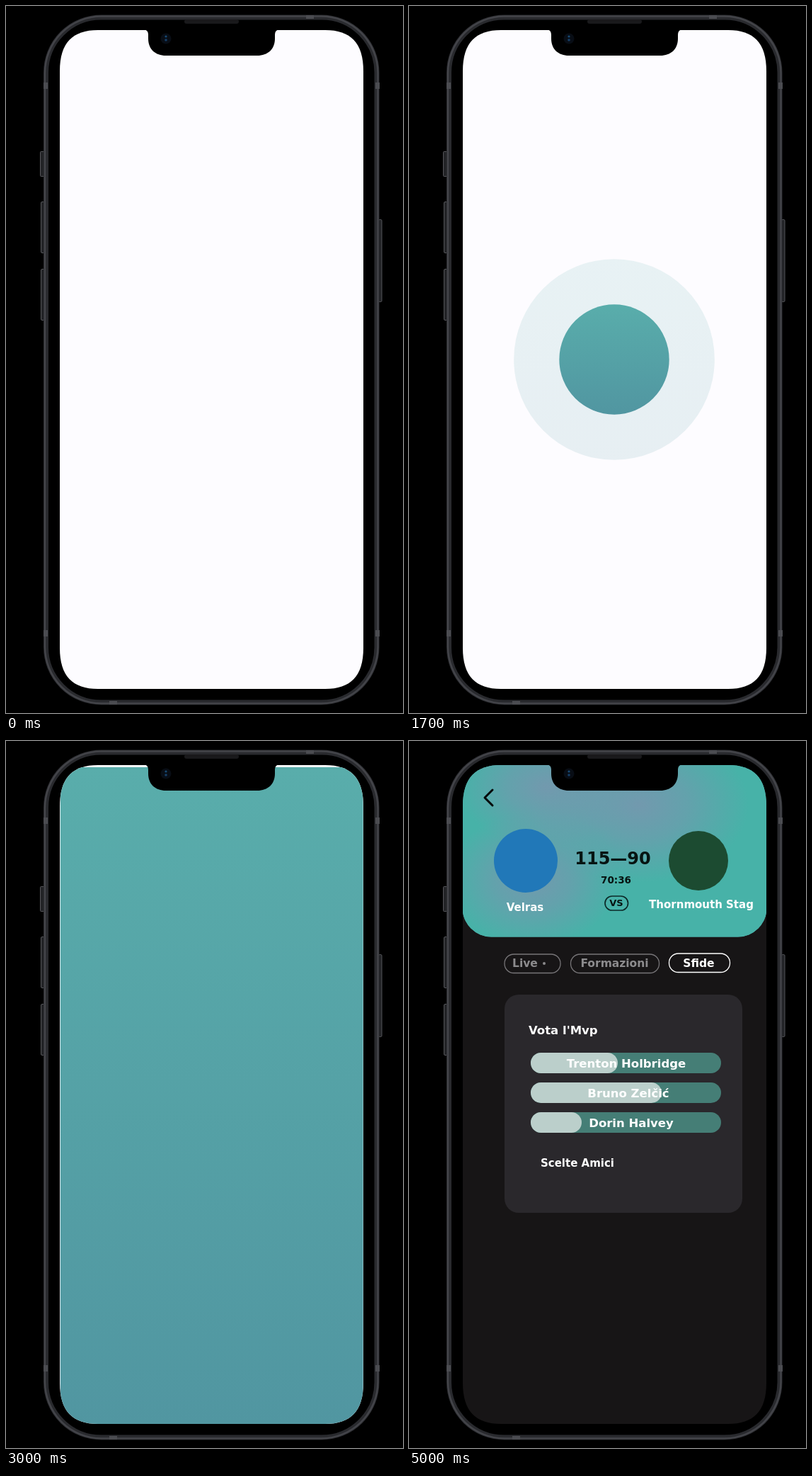
An HTML page for the animation above (5100 ms loop, 561 by 998 pixels).

```html
<!DOCTYPE html>
<html lang="it">
<head>
<meta charset="utf-8">
<title>Match app</title>
<style>
  html, body { margin: 0; width: 100%; height: 100%; overflow: hidden; background: #000; }
  svg { display: block; width: 561px; height: 998px; }
  text { font: bold 15px "DejaVu Sans", sans-serif; fill: #fff; }
  .mid { text-anchor: middle; }
  .ink { fill: #071412; }
  .name { font-size: 16.5px; }
  .tab { font-size: 15.5px; }
  .off { fill: #8c8b8d; }
  .line { fill: none; stroke-width: 1.3; }
</style>
</head>
<body>
<svg viewBox="0 0 561 998" xmlns="http://www.w3.org/2000/svg">
  <defs>
    <linearGradient id="sea" x1="0" y1="0" x2="0" y2="1">
      <stop offset="0" stop-color="#59adab"/>
      <stop offset="1" stop-color="#5196a1"/>
    </linearGradient>
    <radialGradient id="haze">
      <stop offset="0" stop-color="#7299ae"/>
      <stop offset=".45" stop-color="#7299ae" stop-opacity=".65"/>
      <stop offset="1" stop-color="#7299ae" stop-opacity="0"/>
    </radialGradient>
    <clipPath id="screen">
      <path d="M76 92C76 52 94 34 130 34H451C487 34 505 52 505 92V906C505 946 487 964 451 964H130C94 964 76 946 76 906Z"/>
    </clipPath>
    <clipPath id="headClip"><rect id="headShape" x="75.500" y="-60" width="430" rx="41"/></clipPath>
  </defs>

  <rect width="561" height="998"/>

  <!-- phone body -->
  <g fill="#222326" stroke="#55565a">
    <rect x="48.500" y="205.500" width="6" height="35" rx="1"/>
    <rect x="49.500" y="276.500" width="5" height="72" rx="1.500"/>
    <rect x="49.500" y="371.500" width="5" height="72" rx="1.500"/>
    <rect x="526.500" y="301.500" width="4.500" height="116" rx="1.500"/>
  </g>
  <rect x="56.500" y="16" width="467.500" height="967" rx="78" fill="#000" stroke="#292a2e" stroke-width="7"/>
  <rect x="55" y="14.500" width="470.500" height="970" rx="80" fill="none" stroke="#434449" stroke-width="2.500"/>
  <g fill="#4b4c51">
    <rect x="53" y="108" width="6" height="9"/><rect x="522" y="108" width="6" height="9"/>
    <rect x="53" y="881" width="6" height="9"/><rect x="522" y="881" width="6" height="9"/>
    <rect x="424" y="13" width="11" height="5"/><rect x="146" y="981" width="11" height="5"/>
  </g>

  <g clip-path="url(#screen)">
    <rect id="oldPage" x="75" y="33" width="431" height="932" fill="#fdfcff"/>
    <g id="splash">
      <rect x="75" y="34" width="431" height="932" fill="#fdfcff"/>
      <circle id="halo" cx="290" cy="499" fill="url(#sea)"/>
      <rect id="ball" fill="url(#sea)"/>
    </g>

    <g id="match">
      <rect x="75" y="33" width="431" height="932" fill="#171516"/>
      <g clip-path="url(#headClip)">
        <rect x="75" y="33" width="431" height="932" fill="url(#sea)"/>
        <g id="header">
          <rect x="75" y="33" width="431" height="932" fill="#47b2a8"/>
          <g id="blobs" fill="url(#haze)"></g>
          <rect id="lip" x="77" width="427" height="400" rx="36" fill="none" stroke="#1c5c60" stroke-width="2"/>
        </g>
      </g>
      <g id="info">
        <path d="M118 69L107 80L118 91" fill="none" stroke="#050909" stroke-width="3" stroke-linecap="round" stroke-linejoin="round"/>
        <circle cx="165" cy="169" r="45" fill="#2178b8"/>
        <circle cx="409" cy="169" r="42" fill="#1c4b31"/>
        <text class="mid" x="164" y="240">Velras</text>
        <text class="mid" x="413" y="236">Thornmouth Stag</text>
        <text class="mid ink" x="288" y="174" style="font-size:24px">115—90</text>
        <text class="mid ink" x="292.500" y="201" style="font-size:13.5px">70:36</text>
        <rect class="line" x="277" y="219" width="32.500" height="20" rx="10" stroke="#0c2a28" style="stroke-width:1.7"/>
        <text class="mid ink" x="293" y="233" style="font-size:13px">VS</text>
        <g class="line" stroke="#777578">
          <rect x="135" y="301" width="79" height="26.500" rx="13"/>
          <rect x="228.500" y="301" width="125" height="26.500" rx="13"/>
          <rect x="367.500" y="300" width="86" height="26.500" rx="13" stroke="#fff"/>
        </g>
        <text class="tab off" x="146" y="318.500">Live</text>
        <circle cx="191" cy="314" r="2" fill="#8c8b8d"/>
        <text class="tab mid off" x="290.500" y="318.500">Formazioni</text>
        <text class="tab mid" x="409.500" y="318.500">Sfide</text>
      </g>
      <g id="card">
        <rect x="135" y="358" width="336" height="308" rx="20" fill="#2a282c"/>
        <text x="169" y="414" style="font-size:16.5px">Vota l'Mvp</text>
        <g id="bars"></g>
        <text x="186" y="601">Scelte Amici</text>
      </g>
    </g>
  </g>

  <!-- notch, speaker and camera -->
  <path d="M195 33C199 34 201 36 201 41V46C201 61 211 70 226 70H355C370 70 380 61 380 46V41C380 36 382 34 386 33Z"/>
  <rect x="252" y="19" width="77" height="6" rx="3" fill="#19191b"/>
  <circle cx="226" cy="46" r="7.500" fill="#080d15"/>
  <circle cx="226" cy="43" r="1.600" fill="#174b75"/>
  <circle cx="226" cy="48" r="1.800" fill="#153f68"/>
</svg>

<script>
const LOOP = 5100, STEP = 100;
const $ = id => document.getElementById(id);
const clamp = u => Math.min(1, Math.max(0, u));
const part = (t, from, length) => clamp((t - from) / length);
const easeOut = u => 1 - (1 - u) ** 3;
const smooth = u => u * u * (3 - 2 * u);
const mix = (a, b, u) => a + (b - a) * u;

function set(el, attrs) {
  for (const key in attrs) el.setAttribute(key, attrs[key]);
  return el;
}
function add(parent, tag, attrs) {
  return parent.appendChild(set(document.createElementNS("http://www.w3.org/2000/svg", tag), attrs));
}
function show(id, on) {
  $(id).style.display = on ? "" : "none";
}

// each haze: cx, cy, rx, ry at the start and at the end of its drift
const hazes = [
  [[305, 110, 120, 100], [325, 90, 155, 110]],
  [[190, 195, 95, 75], [175, 195, 120, 95]],
  [[440, 55, 100, 60], [195, 65, 125, 85]]
].map(([from, to]) => ({ from, to, el: add($("blobs"), "ellipse", {}) }));

const bars = [
  ["Trenton Holbridge", 440, 123, 307],
  ["Bruno Zelčić", 482, 185, 310],
  ["Dorin Halvey", 524, 72, 314]
].map(([name, y, width, x]) => {
  const box = { x: 172, y, height: 29, rx: 14.5 };
  add($("bars"), "rect", { ...box, width: 269, fill: "#457e76" });
  const fill = add($("bars"), "rect", { ...box, width, fill: "#bbcfcb" });
  add($("bars"), "text", { x, y: y + 20.5, class: "mid name" }).textContent = name;
  return { fill, width };
});

function drawSplash(t) {
  const rise = easeOut(part(t, 50, 700));
  set($("oldPage"), { opacity: (1 - rise) ** 2 });
  set($("splash"), { transform: `translate(0 ${930 * (1 - rise)})` });

  const grow = smooth(part(t, 600, 700));
  const ripple = easeOut(part(t, 1300, 1000));
  const r = mix(mix(23, 66, grow), 94, smooth(part(t, 1300, 900)));
  set($("halo"), {
    r: mix(mix(23, 94, grow), 155, ripple),
    opacity: 0.6 * (1 - ripple)
  });

  // the disc opens into the whole screen
  const open = easeOut(part(t, 2400, 770));
  const left = mix(290 - r, 75.5, open), right = mix(290 + r, 506, open);
  const top = mix(499 - r, 33, open), bottom = mix(499 + r, 969, open);
  set($("ball"), {
    x: left, y: top, width: right - left, height: bottom - top,
    rx: r * (1 - open)
  });
}

function drawMatch(t) {
  const bottom = mix(966, 276.5, easeOut(part(t, 3050, 450)));
  set($("headShape"), { height: bottom + 60 });
  set($("header"), { opacity: smooth(part(t, 3050, 400)) });

  const drift = part(t, 3500, 1500);
  for (const { from, to, el } of hazes) {
    const [cx, cy, rx, ry] = from.map((v, i) => mix(v, to[i], drift));
    set(el, { cx, cy, rx, ry });
  }
  const gap = 240 * (1 - easeOut(part(t, 3100, 700)));
  set($("lip"), { y: 34 + gap, opacity: 0.5 * clamp(gap / 10) });
  set($("info"), { opacity: smooth(part(t, 3100, 350)) });

  set($("card"), { opacity: smooth(part(t, 3550, 400)) });
  const fill = easeOut(part(t, 3650, 550));
  for (const bar of bars) set(bar.fill, { width: bar.width * fill });
}

function draw() {
  let t = Math.floor(performance.now() % LOOP / STEP) * STEP;
  if (t > 4300 && t < 5000) t = 4300;
  const inMatch = t > 3050;
  show("oldPage", !inMatch);
  show("splash", !inMatch);
  show("match", inMatch);
  if (inMatch) drawMatch(t);
  else drawSplash(t);
  requestAnimationFrame(draw);
}
draw();
</script>
</body>
</html>
```
